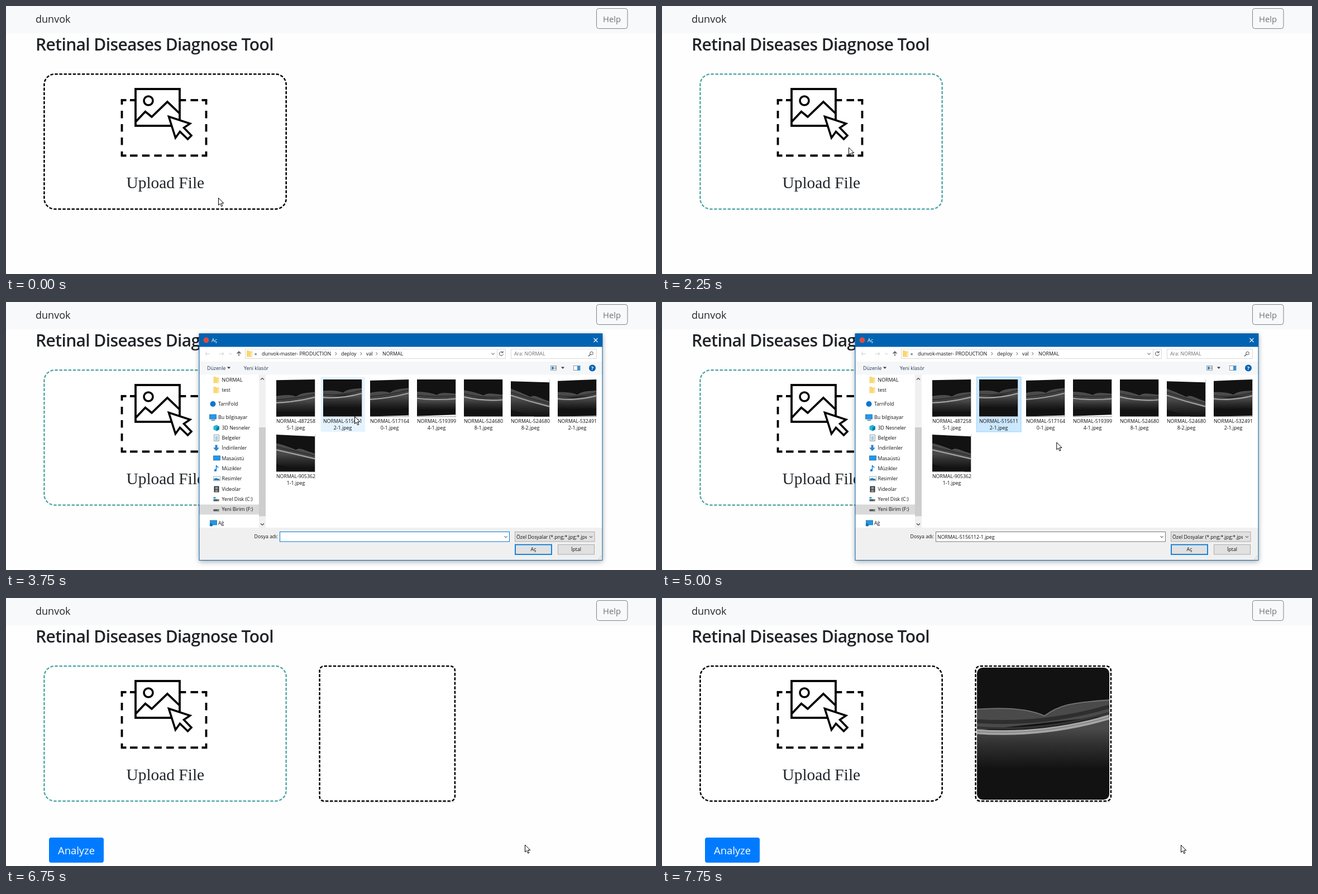
Recreate the animation shown at these times as an HTML page. Size 1164 px wide and 481 px high, loop 8 s.

```html
<!DOCTYPE html>
<html lang="en">
<head>
<meta charset="utf-8">
<title>Upload demo</title>
<style>
html, body { margin: 0; width: 100%; height: 100%; overflow: hidden; background: #fefefe; }
svg { display: block; width: 100%; height: 100%; }
text { font-family: "Open Sans", "Noto Sans", sans-serif; white-space: pre; }
.serif { font-family: "Liberation Serif", serif; }
.heading { font-weight: 600; letter-spacing: -.62px; }
</style>
</head>
<body>
<svg id="stage" viewBox="0 0 1164 481" xmlns="http://www.w3.org/2000/svg"></svg>
<script>
const LOOP = 8000, STEP = 250;
const BLUE = '#0063b1', ACCENT = '#0078d7';

const rect = (x, y, w, h, fill, extra = '') =>
  `<rect x="${x}" y="${y}" width="${w}" height="${h}" fill="${fill}" ${extra}/>`;
const line = (d, color, width = 1, extra = '') =>
  `<path d="${d}" fill="none" stroke="${color}" stroke-width="${width}" ${extra}/>`;
const shape = (d, fill, extra = '') => `<path d="${d}" fill="${fill}" ${extra}/>`;
const dot = (x, y, r, fill, extra = '') => `<circle cx="${x}" cy="${y}" r="${r}" fill="${fill}" ${extra}/>`;
const text = (x, y, s, size = 8.8, fill = '#111', extra = '') =>
  `<text x="${x}" y="${y}" font-size="${size}" fill="${fill}" ${extra}>${s}</text>`;
const group = (id, body, extra = '') => `<g id="${id}" ${extra}>${body}</g>`;
const chevron = (x, y, color = '#444') => line(`M${x - 2.5} ${y - 1.5}l2.5 3 2.5-3`, color);
const next = x => line(`M${x - 1.5} 90l2.5 2.7-2.5 2.7`, '#555');
const caret = (x, y) => shape(`M${x - 3} ${y - 1.5}h6l-3 3.5z`, '#1e395b');

// Rounded box whose border holds a whole number of dashes, two parts ink to one part gap.
function dashedBox(x, y, w, h, r, extra) {
  const length = 2 * (w + h) - (8 - 2 * Math.PI) * r;
  const dashes = Math.round(length / 8.1);
  return rect(x, y, w, h, '#fff',
    `rx="${r}" stroke-width="2.5" pathLength="${3 * dashes}" stroke-dasharray="2 1" ${extra}`);
}

// Layered retina scan in a 100 x 100 box; l, m, r are heights of the bright layer.
function scan(l, m, r) {
  const curve = d => `M0 ${l + d}Q50 ${2 * m - (l + r) / 2 + d} 100 ${r + d}`;
  const top = `M0 ${l - 16}C20 ${(l + m) / 2 - 17} 38 ${m - 16} 51 ${m - 10}` +
    `C62 ${m - 18} 70 ${(m + r) / 2 - 15} 100 ${r - 12}`;
  return rect(0, 0, 100, 100, '#121212') +
    shape(`${curve(2)}L100 ${r + 40}L0 ${l + 40}z`, 'url(#deep)') +
    shape(`${top}L100 ${r}L0 ${l}z`, '#4a4a4a') +
    line(top, '#757575', .8) +
    line(curve(-7), '#2e2e2e', 3) + line(curve(-2.2), '#333', 1.6) +
    line(curve(1), '#a6a6a6', 3.6) + line(curve(.9), '#808080', .6);
}

// name, heights of the layer, then white insets: top left/right, bottom left/right
const files = [
  ['487258', '5-1', 62, 57, 47, 2, 0, 0, 0],
  ['515611', '2-1', 47.5, 46.5, 36.5, 0, 0, 0, 0],
  ['517164', '0-1', 53, 47, 36, 3, 0, 0, 3],
  ['519399', '4-1', 50, 53, 51, 0, 0, 1, 5],
  ['524680', '8-1', 46, 54, 54, 0, 0, 0, 0],
  ['524680', '8-2', 42, 58, 72, 5, 8, 0, 0],
  ['532491', '2-1', 51, 52, 43, 4, 0, 0, 2],
  ['905362', '1-1', 40, 52, 64, 0, 5, 0, 0],
];

function fileTile([head, tail, l, m, r, tl, tr, bl, br], i) {
  const x = 484 + 84 * (i % 7), y = i < 7 ? 139 : 238;
  return rect(x, y, 70, 67.5, '#c4c4c4') +
    `<svg x="${x}" y="${y}" width="69" height="66.5" viewBox="0 0 100 100" preserveAspectRatio="none">` +
    scan(l, m, r) + shape(`M0 0H100V${tr}L0 ${tl}z`, '#fff') +
    shape(`M0 100H100V${100 - br}L0 ${100 - bl}z`, '#fff') + '</svg>' +
    text(x + 35, y + 78, `NORMAL-${head}`, 8.8, '#111', 'text-anchor="middle"') +
    text(x + 35, y + 90, `${tail}.jpeg`, 8.8, '#111', 'text-anchor="middle"');
}

const folder = (x, y) => shape(`M${x} ${y - 6}h4l1 1.5h5v10h-10z`, '#f8d775') + rect(x + 7, y - 2, 3, 7.5, '#fbe7a6');
const screen = (x, y) => rect(x, y - 5, 12, 8, '#1e9be8', 'stroke="#2b6c9c" stroke-width=".8"');
const drive = (x, y) => rect(x, y, 10, 3.5, '#555') + rect(x + 7, y + 1, 2, 1, '#8fe07a');
const icons = {
  folder,
  cloud: (x, y) => dot(x + 6, y, 5, '#0078d4'),
  pc: (x, y) => screen(x, y) + rect(x + 3, y + 4.5, 7, 1.3, '#557'),
  cube: (x, y) => shape(`M${x} ${y - 3}l5.5-2.5 5 2.5v6l-5 2.5-5.5-2.5z`, '#24b5d8') +
    shape(`M${x + 5.5} ${y - 1}l5-2v6l-5 2.5z`, '#0b7ea8'),
  doc: (x, y) => rect(x + 1, y - 5.5, 9, 11, '#f4f8fa', 'stroke="#6d8ea0" stroke-width=".8"') +
    line(`M${x + 3} ${y - 2}h5m-5 2.5h5m-5 2.5h5`, '#4a88ad'),
  down: (x, y) => shape(`M${x + 3} ${y - 5.5}h4v5h3.5l-5.5 6-5.5-6h3.5z`, '#2f84d0'),
  screen,
  note: (x, y) => line(`M${x + 5} ${y + 3}v-9q1 3 4 4`, '#1186d8', 1.5) + dot(x + 3.5, y + 3, 2.3, '#1186d8'),
  pic: (x, y) => rect(x, y - 4, 12, 8, '#f4f8fa', 'stroke="#8aa" stroke-width=".8"') +
    shape(`M${x + 1} ${y + 3}v-3l4-1 6 2v2z`, '#2a78ac'),
  film: (x, y) => rect(x + 1, y - 5.5, 9, 11, '#30343c') + rect(x + 3, y - 4, 5, 4, '#7fa0bd') + rect(x + 3, y + 1, 5, 4, '#9b8b76'),
  disk: (x, y) => drive(x, y) + rect(x, y - 4, 4, 3, '#22a7e0'),
  drive,
  net: (x, y) => screen(x + 1, y) + dot(x + 3, y + 3, 2.8, '#1474b8'),
};

// label, centre, icon, top level or not
const places = [
  ['NORMAL', 140, 'folder'], ['test', 158, 'folder'], ['TarnFold', 183, 'cloud', 1],
  ['Bu bilgisayar', 207, 'pc', 1], ['3D Nesneler', 226, 'cube'], ['Belgeler', 244, 'doc'],
  ['İndirilenler', 262, 'down'], ['Masaüstü', 281, 'screen'], ['Müzikler', 299, 'note'],
  ['Resimler', 317, 'pic'], ['Videolar', 336, 'film'], ['Yerel Disk (C:)', 354, 'disk'],
  ['Yeni Birim (F:)', 372, 'drive'], ['Ağ', 397, 'net', 1],
];
const blankPage = y => shape(`M372.5 ${y - 5.5}h6l3 3v8.5h-9z`, '#fff', 'stroke="#999" stroke-width=".8"');

function dropIcon() {
  let d = '';
  for (const y of [169, 268.5]) for (let i = 0; i < 6; i++) d += `M${222 + i * 21.7} ${y}h13.5`;
  for (const x of [207.5, 358.5]) for (let i = 0; i < 3; i++) d += `M${x} ${188 + i * 24}v13.5`;
  d += 'M207.5 177v-8h8M350.5 169h8v8M358.5 261v7.5h-8M215.5 268.5h-8v-7.5';
  return line(d, '#000', 3.8) +
    rect(232, 149, 79, 66, '#fff', 'stroke="#000" stroke-width="3.8"') +
    dot(255, 170, 8, 'none', 'stroke="#000" stroke-width="3.6"') +
    line('M232 208L249.5 189.5L261 199L289 172L311 193', '#000', 3.8) +
    shape('M291.5 198.5L329.5 211L318.5 218.5L332 232.5L325.5 239L311.5 225.5L303.5 236.5z',
      '#fff', 'stroke="#000" stroke-width="3.6"');
}

function page() {
  return rect(0, 0, 1164, 481, '#fefefe') + rect(0, 0, 1164, 49, '#f8f9fa') +
    text(53, 30, 'dunvok', 18, '#212529') +
    rect(1057.5, 4.5, 55.5, 36, 'none', 'rx="4" stroke="#7b838a"') +
    text(1069, 28.5, 'Help', 14.8, '#6c757d') +
    text(53, 80, 'Retinal Diseases Diagnose Tool', 30, '#212529', 'class="heading"') +
    dashedBox(68.4, 122.2, 433.3, 242.3, 19, 'id="drop"') + dropIcon() +
    text(215.5, 326.5, 'Upload File', 29.4, '#212529', 'class="serif"') +
    group('result',
      rect(562, 364, 242, 4, '#f1f1f1', 'rx="2"') +
      dashedBox(561.6, 122.2, 242.3, 242.3, 8, 'stroke="#000"') +
      rect(77, 430, 98, 45, '#007bff', 'rx="4"') + text(93, 460, 'Analyze', 18.4, '#fff')) +
    group('photo', `<svg x="564" y="125" width="237" height="237" viewBox="0 0 100 100">` +
      `<g clip-path="url(#round)">${scan(47.5, 46.5, 36.5)}</g></svg>`);
}

function addressBar() {
  const arrow = (x, s) => line(`M${x - 4 * s} 93h${8 * s}m${-3 * s}-3l${3 * s} 3 ${-3 * s} 3`, '#ccc');
  return arrow(361, -1) + arrow(386, 1) + chevron(402, 93, '#ccc') +
    line('M417 97v-8m-3.5 3.5l3.5-3.5 3.5 3.5', '#444', 1.2) +
    rect(428.5, 84.5, 466, 17, '#fff', 'stroke="#d9d9d9"') + folder(431, 93) + text(445, 95.5, '«') +
    text(458, 95.5, 'dunvok-master- PRODUCTION') + next(591) + text(600, 95.5, 'deploy') + next(636) +
    text(645, 95.5, 'val') + next(664) + text(674, 95.5, 'NORMAL') +
    chevron(872, 93) + line('M879.5 85v16', '#d9d9d9') +
    line('M889.5 90.5a3.5 3.5 0 1 0 .8 3M890 88v3h-3', '#444') +
    rect(904.5, 84.5, 153, 17, '#fff', 'stroke="#d9d9d9"') + text(910, 96, 'Ara: NORMAL', 8.8, '#6d6d6d') +
    dot(1048.5, 92, 2.8, 'none', 'stroke="#555"') + line('M1046.5 94l-3.5 3.5', '#555', 1.2) +
    text(360, 121.5, 'Düzenle', 8.8, '#1e395b') + caret(399, 118) + text(426, 121.5, 'Yeni klasör', 8.8, '#1e395b') +
    rect(975.5, 114.5, 10, 8, '#fff', 'stroke="#8a9aa8"') + rect(977, 116, 4, 5, '#3488c8') +
    line('M982 117h3m-3 2.5h3', '#567') + caret(997, 118);
}

function footer() {
  const button = (id, x, label, style) => rect(x, 435.5, 65, 17.5, '#e1e1e1', `id="${id}" ${style}`) +
    text(x + 32.5, 447, label, 8.8, '#111', 'text-anchor="middle"');
  return text(487, 424, 'Dosya adı:', 8.8, '#111', 'text-anchor="end"') +
    rect(490.5, 412.5, 411, 17.5, '#fff', 'id="field"') + chevron(895, 421.5) +
    group('chosen', text(493, 424.5, 'NORMAL-5156112-1.jpeg')) +
    rect(911.5, 412.5, 142.5, 17.5, '#e1e1e1', 'stroke="#adadad"') +
    `<svg x="912" y="412" width="128" height="18">${text(2, 12.5, 'Özel Dosyalar (*.png;*.jpg;*.jpeg)')}</svg>` +
    chevron(1047.5, 421.5) +
    button('open', 912, 'Aç', `stroke="${ACCENT}" stroke-width="1.8"`) +
    button('cancel', 988.5, 'İptal', 'stroke="#adadad"') +
    line('M1060 461h6M1063 458.5h3M1064.5 456h1.5', '#b5b5b5', 1.2, 'stroke-dasharray="1.5 1.2"');
}

function emptyFooter() {
  return rect(445, 415, 42, 11.5, '#fff') + rect(490, 412, 412, 18.5, '#fff') +
    rect(911, 412, 143.5, 18, '#fff') + rect(911, 434, 67.5, 20, '#fff') +
    rect(987, 434, 67.5, 20, '#fff') + rect(1055, 450, 12.5, 13, '#fff');
}

function dialog() {
  const labels = places.map(([s, y, , top]) => text(top ? 380 : 386.5, y + 3, s)).join('');
  const glyphs = places.map(([, y, icon, top]) => icons[icon](top ? 364.5 : 371.5, y)).join('');
  const blanks = places.filter(p => /folder|drive|disk/.test(p[2])).map(p => blankPage(p[1])).join('');
  return rect(346, 57, 722, 407, '#fff', 'filter="url(#shade)"') +
    rect(346, 56.5, 722, 24, BLUE) + dot(358.5, 68.5, 5, '#dd4b3e') +
    text(368, 72, 'Aç', 9.2, '#fff') + line('M1052.5 65l7 7m0-7l-7 7', '#fff', 1.1) +
    rect(346, 107, 722, 23.5, '#f5f6f7') + rect(346, 405, 722, 58, '#f0f0f0') +
    rect(1016.5, 114.5, 11.5, 8, '#fff', 'stroke="#7c98ae"') + rect(1023, 115, 5, 7.5, '#3693d6') +
    dot(1050, 118.5, 6, BLUE) + text(1050, 122, '?', 9.5, '#fff', 'text-anchor="middle" font-weight="700"') +
    rect(346, 363.5, 107, 18, '#d9d9d9') +
    rect(453, 130.5, 12, 274.5, '#f0f0f0') + rect(453, 225, 12, 159.5, '#cdcdcd') +
    line('M456 139.5l3-3 3 3M456 397.5l3 3 3-3', '#444', 1.2) +
    labels + group('loading', blanks + emptyFooter()) + group('loaded', glyphs + addressBar() + footer()) +
    group('files', rect(563.5, 134.5, 79.5, 98.5, '#e5f3ff', 'id="mark"') + files.map(fileTile).join('')) +
    rect(346, 57, 722, 406.5, 'none', `stroke="${BLUE}"`);
}

const stage = document.getElementById('stage');
stage.innerHTML = `<defs>
  <linearGradient id="deep" x1="0" y1="0" x2="0" y2="1">
    <stop offset=".15" stop-color="#4a4a4a"/><stop offset=".4" stop-color="#303030"/><stop offset=".78" stop-color="#121212"/>
  </linearGradient>
  <clipPath id="round"><rect width="100" height="100" rx="4.2"/></clipPath>
  <filter id="shade" x="-5%" y="-8%" width="110%" height="116%">
    <feDropShadow dx="0" dy="2" stdDeviation="5" flood-color="#000" flood-opacity=".35"/>
  </filter>
</defs>` + page() + group('dialog', dialog()) +
  group('cursor', shape('M0 0V13L3 10.3L5.2 15.2L7.3 14.3L5.2 9.5H9.3z', '#fff', 'stroke="#000" stroke-width="1"'));

const el = id => document.getElementById(id);
const show = (id, on) => el(id).setAttribute('display', on ? 'inline' : 'none');
const set = (id, attrs) => { for (const k in attrs) el(id).setAttribute(k, attrs[k]); };
const clamp = v => Math.min(1, Math.max(0, v));

// time, x, y of the pointer tip
const track = [
  [0, 380.5, 344.5], [250, 377, 336], [1250, 346, 260.5], [1500, 339, 252], [1750, 334.5, 254],
  [2250, 334.5, 254], [2750, 344, 261.5], [3250, 350, 260], [3750, 624.5, 205.5], [4500, 638, 186],
  [4750, 640, 190], [5750, 907, 438], [6250, 929.5, 443], [7250, 929.5, 443], [7500, 929.5, 443.5],
];
function pointer(t) {
  const i = track.findIndex(p => p[0] > t);
  if (i < 0) return track[track.length - 1].slice(1);
  const [a, b] = [track[i - 1], track[i]], k = (t - a[0]) / (b[0] - a[0]);
  return [1, 2].map(n => a[n] + (b[n] - a[n]) * k);
}

function draw(time) {
  const t = Math.floor(time % LOOP / STEP) * STEP;
  const tint = clamp(t / 500) * (1 - clamp((t - 7000) / 500));
  const color = [82, 170, 168].map(c => Math.round(c * tint));
  set('drop', { stroke: `rgb(${color})` });

  show('dialog', t >= 2500 && t < 6500);
  show('loading', t < 3000);
  show('loaded', t >= 3000);
  set('files', { transform: `translate(0 ${t < 3000 ? 2 : 0})` });

  const picked = t >= 4250, pressed = t >= 6250;
  show('mark', t >= 3750);
  set('mark', {
    fill: pressed ? '#d9d9d9' : picked ? '#cce8ff' : '#e5f3ff',
    stroke: pressed ? '#c4c4c4' : picked ? '#99d1ff' : 'none',
  });
  show('chosen', picked);
  set('field', { stroke: t < 4750 ? ACCENT : '#7a7a7a' });
  set('open', {
    fill: pressed ? '#cce4f7' : t >= 6000 ? '#e5f1fb' : '#e1e1e1',
    stroke: pressed ? '#005499' : ACCENT,
    'stroke-width': t >= 6000 ? 1.1 : 1.8,
  });

  show('result', t >= 6750);
  show('photo', t >= 7000);
  set('cursor', { transform: `translate(${pointer(t)})` });
}

const start = performance.now();
function tick() {
  draw(performance.now() - start);
  requestAnimationFrame(tick);
}
tick();
</script>
</body>
</html>
```
